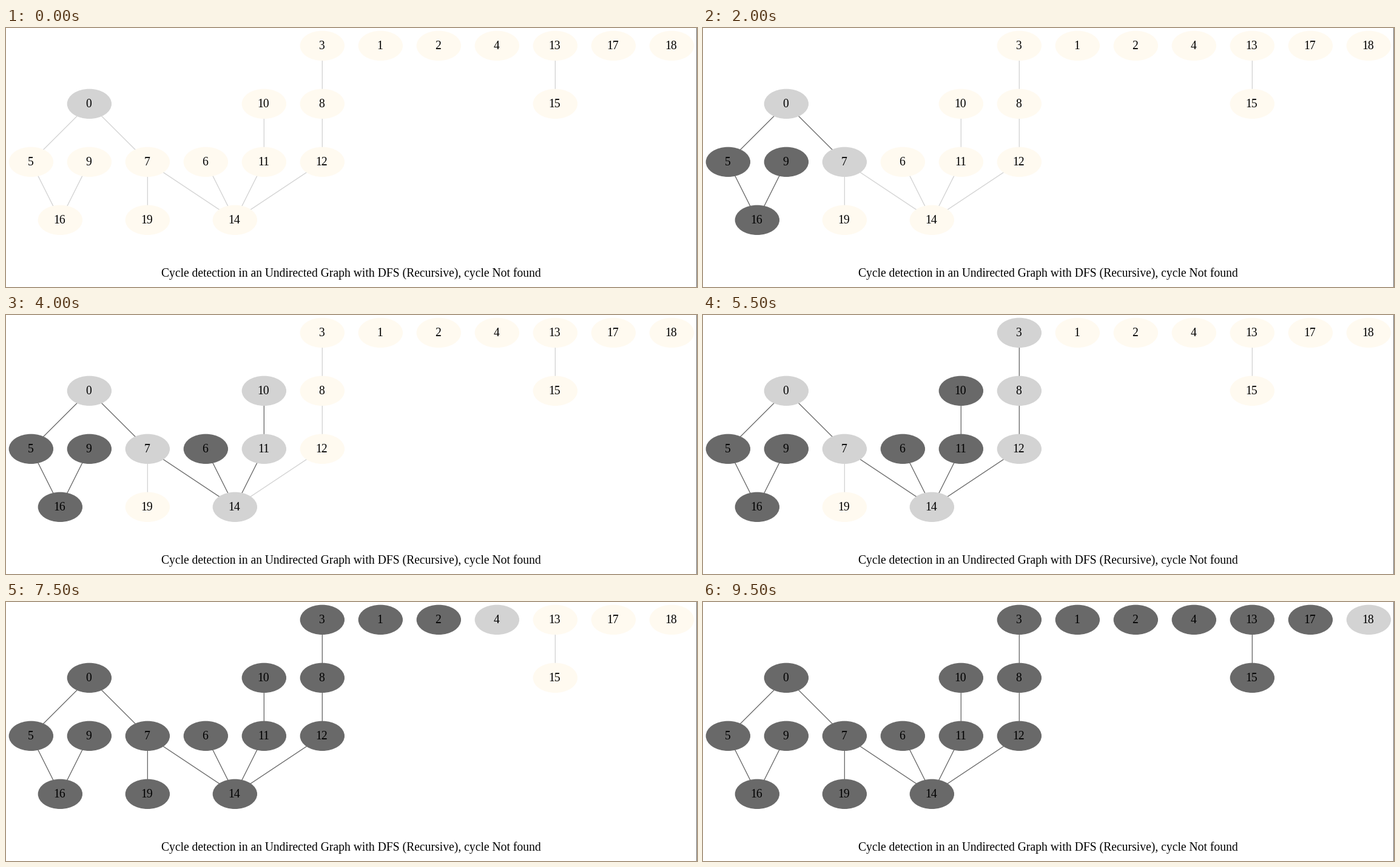
Recreate the animation shown at these times as a matplotlib script. Size 1139x428 px, loop 10 s.

```python
import matplotlib.pyplot as plt
import numpy as np
from itertools import pairwise
from matplotlib.animation import FuncAnimation
from matplotlib.patches import Ellipse, Rectangle

W, H, DPI = 1139, 428, 64
PT = 72 / DPI  # points per pixel
STEP, PAD = 96, 16 / 3
NODE_W, NODE_H = 72, 48
STROKE = 4 / 3 * PT
UNSEEN, ACTIVE, DONE = "floralwhite", "lightgray", "dimgray"
EDGE_IDLE, EDGE_USED = "lightgray", "dimgray"
TITLE = "Cycle detection in an Undirected Graph with DFS (Recursive), cycle Not found"

# The graph as paths, and the two rows that anchor its layout
PATHS = "0-5-16-9 0-7-14-6 7-19 14-11-10 14-12-8-3 13-15"
TOP_ROW = "3 1 2 4 13 17 18"
MAIN_ROW = "5 9 7 6 11 12"
BOTTOM_ROW = "16 19 14"


def find_edges():
    paths = ([int(n) for n in path.split("-")] for path in PATHS.split())
    return [tuple(sorted(pair)) for path in paths for pair in pairwise(path)]


def neighbours(node):
    return sorted(b if a == node else a for a, b in EDGES if node in (a, b))


def layout():
    """Grid cell of every node; free nodes sit midway between their neighbours."""
    top, main, bottom = ([int(n) for n in row.split()]
                         for row in (TOP_ROW, MAIN_ROW, BOTTOM_ROW))
    cells = {n: (5 + i, 0) for i, n in enumerate(top)}
    cells |= {n: (i, 2) for i, n in enumerate(main)}
    fixed = dict(cells)
    for n in range(20):
        if n not in fixed:
            col = np.mean([fixed[m][0] for m in neighbours(n) if m in fixed])
            cells[n] = (col, 3 if n in bottom else 1)
    return cells


def center(node):
    col, row = CELLS[node]
    return PAD + NODE_W / 2 + STEP * col, PAD + NODE_H / 2 + STEP * row


def dfs_steps():
    """One (node colours, used edges) snapshot per discovered node."""
    state = dict.fromkeys(sorted(CELLS), UNSEEN)
    used, steps = set(), []

    def visit(node):
        state[node] = ACTIVE
        steps.append((dict(state), set(used)))
        for other in neighbours(node):
            if state[other] == UNSEEN:
                used.add(tuple(sorted((node, other))))
                visit(other)
        state[node] = DONE

    for root in state:
        if state[root] == UNSEEN:
            visit(root)
    return steps


EDGES = find_edges()
CELLS = layout()
STEPS = dfs_steps()

fig = plt.figure(figsize=(W / DPI, H / DPI), dpi=DPI, facecolor="white")
ax = fig.add_axes([0, 0, 1, 1])
ax.set_xlim(0, W)
ax.set_ylim(H, 0)
ax.axis("off")

font = dict(family="Liberation Serif", size=19.66 * PT, color="black",
            ha="center", va="baseline", zorder=3)

lines = {}
for edge in EDGES:
    xs, ys = zip(*map(center, edge))
    lines[edge], = ax.plot(xs, ys, lw=STROKE, snap=False, zorder=1)

nodes = {}
for n in CELLS:
    x, y = center(n)
    nodes[n] = ax.add_patch(Ellipse((x, y), NODE_W, NODE_H, lw=STROKE, zorder=2))
    ax.text(x - 1, y + 5.67, str(n), **font)

ax.text(568.5, 411, TITLE, **font)
ax.add_patch(Rectangle((W - 1, 0), 1, H, color=DONE, lw=0))


def draw(i):
    state, used = STEPS[i]
    for n, patch in nodes.items():
        patch.set_color(state[n])
    for edge, line in lines.items():
        line.set_color(EDGE_USED if edge in used else EDGE_IDLE)
    return [*lines.values(), *nodes.values()]


anim = FuncAnimation(fig, draw, frames=len(STEPS), interval=500,
                     repeat=True, repeat_delay=0, blit=False)
plt.show()
```
